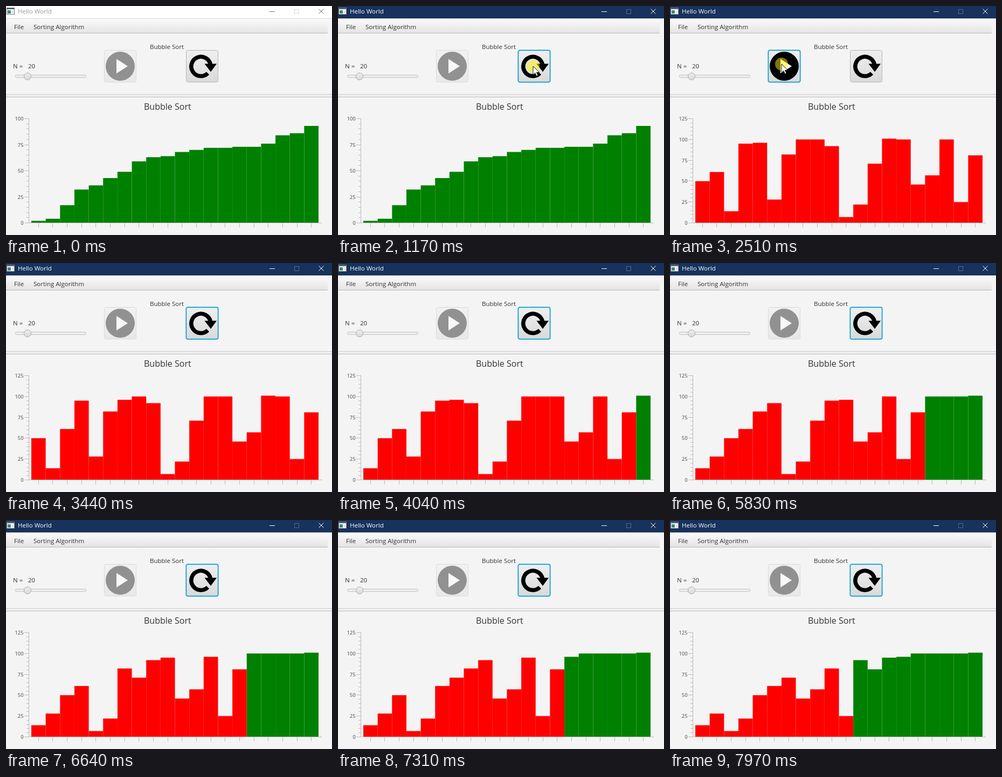
An HTML page that plays this animation: 605x426 px, repeating every 8000 ms.

```html
<!DOCTYPE html>
<html lang="en">
<head>
<meta charset="utf-8">
<title>Bubble Sort</title>
<style>
  html, body { margin: 0; width: 100%; height: 100%; overflow: hidden; background: #f4f4f4; }
  svg { display: block; width: 605px; height: 426px; }
  text { font: 11.5px "Open Sans", "Noto Sans", sans-serif; fill: #333; white-space: pre; }
  .tick { font-size: 9.4px; fill: #444; text-anchor: end; }
  .axis { stroke: #b9b9b9; fill: none; }
  .disabled { opacity: .4; }
  .ring { visibility: hidden; }
  .focused .ring { visibility: visible; }
  #titleBar { fill: #fff; }
  #titleText { fill: #999; }
  #controls { stroke: #777; fill: none; }
  .active #titleBar { fill: #17325d; }
  .active #titleText { fill: #fff; }
  .active #controls { stroke: #fff; }
</style>
</head>
<body>
<svg id="stage" viewBox="0 0 605 426">
  <defs>
    <linearGradient id="menuFill" x2="0" y2="1">
      <stop stop-color="#f9f9f9"/><stop offset="1" stop-color="#e4e4e4"/>
    </linearGradient>
    <linearGradient id="buttonFill" x2="0" y2="1">
      <stop stop-color="#efefef"/><stop offset="1" stop-color="#d9d9d9"/>
    </linearGradient>
    <g id="buttonBase">
      <rect x=".5" y=".5" width="59" height="59" rx="3" fill="url(#buttonFill)" stroke="#b4b4b4"/>
    </g>
    <g id="focusRing" fill="none" stroke="#039ed3">
      <rect x="-.5" y="-.5" width="61" height="61" rx="3.5" stroke-opacity=".35"/>
      <rect x=".5" y=".5" width="59" height="59" rx="3" stroke-width="1.4"/>
    </g>
  </defs>
  <rect width="605" height="426" fill="#f4f4f4"/>

  <rect id="titleBar" width="605" height="23"/>
  <rect x="1.5" y="3.5" width="14" height="12" fill="#fff" stroke="#777"/>
  <path d="M2 5h13" stroke="#555" stroke-width="2"/>
  <rect x="3" y="8" width="6" height="6" fill="#3b8583"/>
  <path d="M11 9.5h3M11 12.5h3" stroke="#aaa"/>
  <text id="titleText" x="22" y="14">Hello World</text>
  <g id="controls">
    <path d="M489 10.5h10M580.5 5.5l9 9m0-9l-9 9"/>
    <rect x="535.5" y="6.5" width="8" height="8" opacity=".28"/>
  </g>

  <path d="M0 23.5h605" stroke="#d2d2d2"/>
  <path d="M0 24.5h605" stroke="#fff"/>
  <rect y="26" width="597" height="24" fill="url(#menuFill)"/>
  <path d="M0 50.5h597" stroke="#bababa"/>
  <text x="15" y="43">File</text>
  <text x="51" y="43">Sorting Algorithm</text>

  <text x="267" y="80">Bubble Sort</text>
  <text x="13" y="116">N =</text>
  <text x="41" y="116">20</text>
  <rect x="17.5" y="128.5" width="131" height="4.5" rx="2.2" fill="#f0f0f0" stroke="#bcbcbc"/>
  <circle cx="40" cy="131" r="6.5" fill="url(#buttonFill)" stroke="#a9a9a9"/>

  <g id="play" transform="translate(182 82)">
    <use href="#buttonBase"/>
    <circle cx="30" cy="30" r="27"/>
    <path d="M23 16.5v27L44 30z" fill="#fff"/>
    <use href="#focusRing" class="ring"/>
  </g>
  <g id="reset" transform="translate(334 82)">
    <use href="#buttonBase"/>
    <path d="M40.5 43.2A18 18 0 1 1 45.5 27" fill="none" stroke="#000" stroke-width="7.5"/>
    <path d="M34.5 25.5H57L46 40.5z"/>
    <use href="#focusRing" class="ring"/>
  </g>

  <rect y="165" width="605" height="4" fill="#ececec"/>
  <path d="M0 164.5h605M0 169.5h605" stroke="#c3c3c3"/>
  <path d="M0 165.5h605" stroke="#fafafa"/>

  <text x="256" y="193" style="font-size:16px">Bubble Sort</text>
  <g id="scale"></g>
  <g id="bars"></g>
  <path id="frame" class="axis"/>

  <g id="cursor">
    <circle r="12" fill="#fff000" fill-opacity=".5"/>
    <path d="M0 0v16l3.8-3.6 2.6 6 2.6-1.2-2.6-5.8h5.2z" fill="#fff" stroke="#000" stroke-width=".9"/>
  </g>
</svg>
<script>
const LOOP = 8000, CAPTURE = 30;
const LEFT = 47, PITCH = 26.65, BASE = 403.5, HEIGHT = 194;
const RED = '#f00', GREEN = '#008000';
const AT = { enter: 20, activate: 1140, shuffle: 1330, press: 2500, run: 2580, leave: 3340 };

const sorted = [2, 4, 17, 32, 36, 43, 49, 59, 63, 64, 68, 70, 72, 72, 73, 73, 76, 84, 86, 93];
const shuffled = [50, 61, 14, 95, 96, 28, 82, 100, 100, 92, 7, 22, 71, 101, 100, 46, 57, 100, 25, 81];
const N = shuffled.length;

// [time, comparisons made]
const pace = [[2770, 0], [3430, 15.7], [4030, 29.97], [5080, 53.9], [6640, 90.6], [7960, 123.15], [8000, 124]];
// [time, x, y]
const pointer = [[20, 490, 400], [420, 448, 300], [830, 395, 199], [1130, 362, 112], [1330, 362, 112],
  [1700, 290, 72], [2120, 207, 108], [2580, 207, 108], [2950, 390, 175], [3340, 622, 300]];

const $ = id => document.getElementById(id);

function add(parent, tag, attrs, text = '') {
  const node = document.createElementNS('http://www.w3.org/2000/svg', tag);
  for (const key in attrs) node.setAttribute(key, attrs[key]);
  node.textContent = text;
  return parent.appendChild(node);
}

function along(points, t) {
  let i = 0;
  while (i < points.length - 2 && t >= points[i + 1][0]) i++;
  const [a, b] = [points[i], points[i + 1]];
  const f = Math.min(1, Math.max(0, (t - a[0]) / (b[0] - a[0])));
  return a.slice(1).map((v, k) => v + (b[k + 1] - v) * f);
}

function buildScale(max) {
  const group = add($('scale'), 'g', {});
  let path = '';
  for (let v = 0; v <= max; v += 5) {
    const y = Math.round(BASE - v / max * HEIGHT - .5) + .5;
    const major = v % 25 === 0;
    path += `M${major ? 34 : 38} ${y}H43`;
    if (major) add(group, 'text', { class: 'tick', x: 32.5, y: y + 3.5 }, v);
  }
  add(group, 'path', { class: 'axis', d: path });
  return group;
}

const scales = { 100: buildScale(100), 125: buildScale(125) };
const bars = sorted.map((_, i) => add($('bars'), 'rect', { x: LEFT + i * PITCH, width: PITCH }));
$('frame').setAttribute('d', 'M42.5 209V403.5H586' +
  bars.map((_, i) => `M${Math.floor(LEFT + (i + .5) * PITCH) + .5} 404v8`).join(''));

function sortState(t) {
  const values = [...shuffled];
  const result = { values, isGreen: () => false };
  if (t < pace[0][0]) return result;

  const [progress] = along(pace, t);
  const done = Math.floor(progress + .7);
  const comparing = progress % 1 < .3;
  let pass = 0, j = 0;
  for (let k = 0; k < done; k++) {
    if (values[j] > values[j + 1]) [values[j], values[j + 1]] = [values[j + 1], values[j]];
    if (++j === N - 1 - pass) { pass++; j = 0; }
  }
  result.isGreen = i => i >= N - pass || comparing && (i === j || i === j + 1);
  return result;
}

function draw(t) {
  const captured = Math.floor((t - 10) / CAPTURE) * CAPTURE + 10;
  const fresh = t >= AT.shuffle;
  const { values, isGreen } = fresh ? sortState(captured) : { values: sorted, isGreen: () => true };
  const max = fresh ? 125 : 100;

  for (const key in scales) scales[key].style.display = +key === max ? '' : 'none';
  bars.forEach((bar, i) => {
    const h = values[i] / max * HEIGHT;
    bar.setAttribute('y', BASE - h);
    bar.setAttribute('height', h);
    bar.setAttribute('fill', isGreen(i) ? GREEN : RED);
  });

  const active = t >= AT.activate;
  const playFocused = t >= AT.press && t < AT.run;
  $('stage').classList.toggle('active', active);
  $('play').classList.toggle('disabled', !fresh || t >= AT.run);
  $('play').classList.toggle('focused', playFocused);
  $('reset').classList.toggle('focused', active && !playFocused);

  const [x, y] = along(pointer, captured);
  $('cursor').setAttribute('transform', `translate(${x.toFixed(1)} ${y.toFixed(1)})`);
  $('cursor').style.display = t >= AT.enter && t < AT.leave ? '' : 'none';
}

const start = performance.now();
function tick() {
  draw((performance.now() - start) % LOOP);
  requestAnimationFrame(tick);
}
tick();
</script>
</body>
</html>
```
